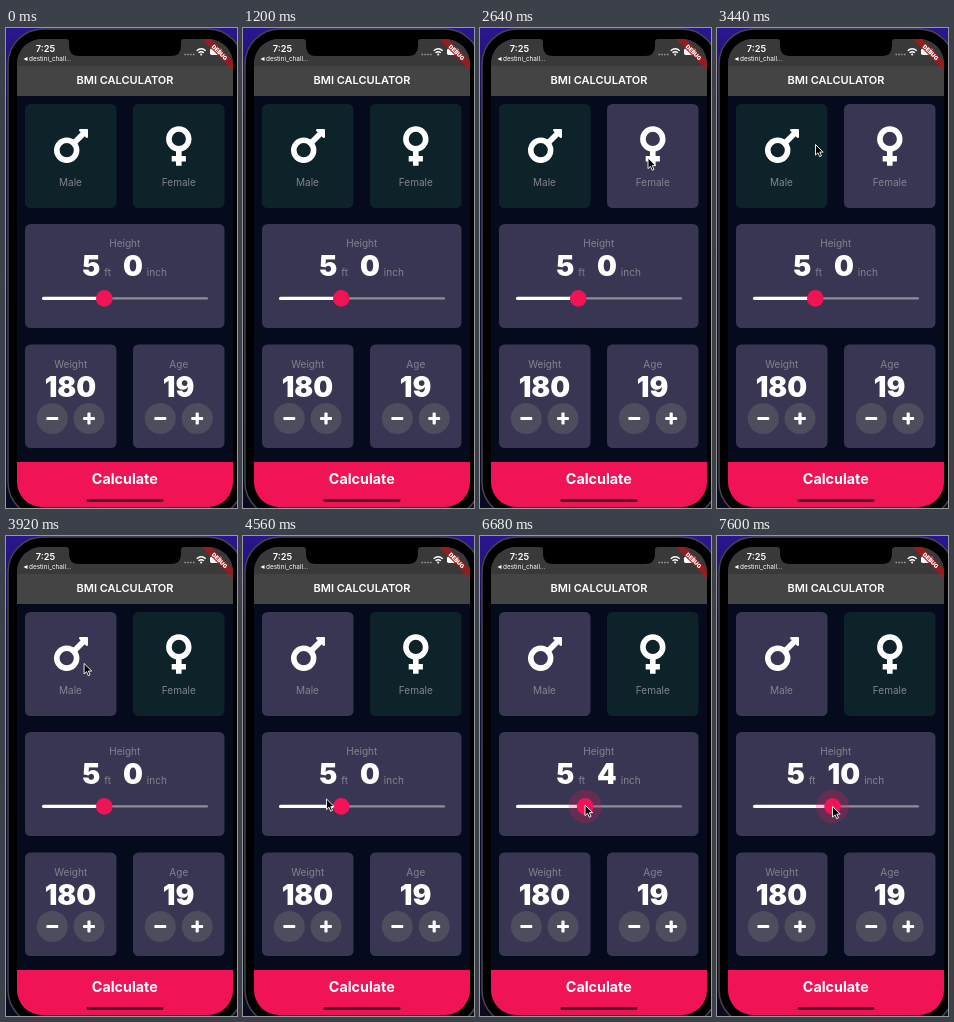
Recreate the animation shown at these times as an HTML page. Size 231 by 480 pixels, loop 8000 ms.

```html
<!DOCTYPE html>
<html lang="en">
<head>
<meta charset="utf-8">
<title>BMI calculator</title>
<style>
  html, body { margin: 0; width: 100%; height: 100%; overflow: hidden; background: #000; }
  svg { display: block; width: 231px; height: 480px; font-family: Inter, sans-serif; }
  text { fill: #fff; text-anchor: middle; }
  .label { font-size: 10px; fill: #83838f; }
  .number { font-size: 28px; font-weight: 900; fill: #fff; }
  .card { fill: #383652; }
  .card.idle { fill: #0d2329; }
  .icon { fill: none; stroke: #fff; stroke-width: 5.6; }
</style>
</head>
<body>
<svg viewBox="0 0 231 480">
  <defs>
    <linearGradient id="wall" x2="0" y2="1">
      <stop offset="0" stop-color="#2a1790"/>
      <stop offset=".2" stop-color="#130c42"/>
      <stop offset="1" stop-color="#0a0a20"/>
    </linearGradient>
    <clipPath id="screen"><rect x="11" y="11" width="216" height="468" rx="25"/></clipPath>
    <g id="minus"><circle r="15.5" fill="#4c4e5e"/><rect x="-6" y="-1.6" width="12" height="3.2" rx="1" fill="#fff"/></g>
    <g id="plus"><use href="#minus"/><rect x="-1.6" y="-6" width="3.2" height="12" rx="1" fill="#fff"/></g>
  </defs>

  <rect width="231" height="480" fill="url(#wall)"/>
  <rect x="2" y="1" width="235" height="488" rx="35" stroke="#45454b" stroke-width="1.5"/>

  <g clip-path="url(#screen)">
    <rect width="231" height="480" fill="#050a1d"/>
    <rect y="11" width="231" height="57" fill="#444"/>
    <rect y="11" width="231" height="27" fill="#393939"/>
    <path d="M60 11q3 0 3 3v4q0 10 10 10h92q10 0 10-10v-4q0-3 3-3z"/>

    <text x="39.5" y="24" font-size="9.2" font-weight="600">7:25</text>
    <path d="M17.5 31l4-2v4z" fill="#fff"/>
    <text x="23" y="33" font-size="6.4" style="text-anchor:start">destini_chall...</text>
    <path d="M178.500 26.500h10" stroke="#999" stroke-width="1.3" stroke-dasharray="1.6 1.2"/>
    <g fill="none" stroke="#fff" stroke-width="1.4">
      <path d="M190.700 22.700q4.500-4 9 0M192.500 24.800q2.700-2.300 5.400 0"/>
      <circle cx="195.200" cy="26.500" r=".4"/>
    </g>
    <rect x="204" y="20.500" width="12" height="6.500" rx="1.800" fill="#fff"/>
    <g transform="translate(227 11) rotate(45)">
      <rect x="-30" y="15.500" width="60" height="6.700" fill="#a5191c" fill-opacity=".85"/>
      <text y="20.900" font-size="5.6" font-weight="900">DEBUG</text>
    </g>
    <text x="119" y="56" font-size="11" font-weight="600">BMI CALCULATOR</text>

    <rect id="male" class="card" x="19" y="76" width="91.500" height="104" rx="5.500"/>
    <rect id="female" class="card" x="127" y="76" width="91.500" height="104" rx="5.500"/>
    <rect class="card" x="19" y="196" width="199.500" height="104" rx="5.500"/>
    <rect class="card" x="19" y="316.500" width="91.500" height="103.500" rx="5.500"/>
    <rect class="card" x="127" y="316.500" width="91.500" height="103.500" rx="5.500"/>

    <circle class="icon" cx="60.700" cy="122.200" r="9.900"/>
    <path class="icon" d="M68 115l9-9"/>
    <path d="M74 101h7q1 0 1 1v7q-.5 1.600-1.900.7l-7-7q-.6-1.200.9-1.700z" fill="#fff"/>
    <circle class="icon" cx="172.800" cy="110.900" r="9.900"/>
    <path class="icon" d="M172.800 121v16.800M165.700 130.700h14.200"/>

    <text class="label" x="64.500" y="158">Male</text>
    <text class="label" x="172.800" y="158">Female</text>
    <text class="label" x="118.800" y="218.500">Height</text>
    <text class="label" x="64.700" y="339.500">Weight</text>
    <text class="label" x="172.800" y="339.500">Age</text>
    <text class="number" x="64.500" y="368.500">180</text>
    <text class="number" x="172.500" y="368.500">19</text>
    <text class="label" x="118.500" y="247.500"><tspan class="number" id="feet"></tspan><tspan dx="4">ft</tspan><tspan class="number" id="inches" dx="12"></tspan><tspan dx="4">inch</tspan></text>

    <use href="#minus" x="46.300" y="390.500"/>
    <use href="#plus" x="83" y="390.500"/>
    <use href="#minus" x="154.300" y="390.500"/>
    <use href="#plus" x="191.200" y="390.500"/>

    <rect x="36" y="269.200" width="166" height="2.400" rx="1.200" fill="#8d8e98"/>
    <rect id="filled" x="36" y="268.700" height="3.400" rx="1.700" fill="#fff"/>
    <circle id="halo" cy="270.400" fill="#eb1555" fill-opacity=".24"/>
    <circle id="thumb" cy="270.400" r="8.300" fill="#f01457"/>

    <rect y="434" width="231" height="46" fill="#f01457"/>
    <text x="118.800" y="455.500" font-size="14.300" font-weight="700">Calculate</text>
    <rect x="80.500" y="471" width="77" height="2.800" rx="1.400" fill="#4a0a20"/>
  </g>

  <path id="cursor" d="M0 0v10.600l2.500-2.300 1.700 3.900 1.800-.8-1.700-3.800h3.400z" stroke="#fff" stroke-width=".9" stroke-linejoin="round"/>
</svg>
<script>
  const LOOP = 8000;
  const el = id => document.getElementById(id);
  const clamp = v => Math.min(1, Math.max(0, v));
  const smooth = v => v * v * (3 - 2 * v);

  // Each stop: time, x, y of the pointer tip.
  const pointerPath = [
    [1560, 92, 152], [1800, 74, 134], [2000, 74, 134], [2360, 134, 125], [2600, 168, 130],
    [3080, 168, 130], [3440, 98.500, 116.500], [3640, 78, 126], [3880, 78, 126],
    [4560, 83.500, 263], [4720, 88, 269], [5040, 97.500, 269], [5800, 97.500, 269],
    [6680, 105, 269], [7600, 115.500, 270.500]
  ];
  // Each stop: time, height in inches.
  const heightPath = [[5800, 60], [6680, 64.200], [7560, 70]];

  function along(path, t, ease = v => v) {
    const next = path.findIndex(stop => stop[0] > t);
    if (next < 0) return path.at(-1).slice(1);
    if (next === 0) return path[0].slice(1);
    const a = path[next - 1], b = path[next];
    const k = ease((t - a[0]) / (b[0] - a[0]));
    return a.slice(1).map((v, i) => v + (b[i + 1] - v) * k);
  }

  function draw(t) {
    const maleOn = t >= 1840 && t < 2640 || t >= 3600;
    const femaleOn = t >= 2640 && t < 3600;
    el('male').classList.toggle('idle', !maleOn);
    el('female').classList.toggle('idle', !femaleOn);

    const height = Math.round(along(heightPath, t)[0]);
    el('feet').textContent = Math.floor(height / 12);
    el('inches').textContent = height % 12;
    const x = 36 + (height - 24) * 166 / 96;
    el('filled').setAttribute('width', x - 36);
    el('thumb').setAttribute('cx', x);
    el('halo').setAttribute('cx', x);
    el('halo').setAttribute('r', 16.600 * smooth(clamp((t - 5480) / 160)));

    const [px, py] = along(pointerPath, t, t < 5800 ? smooth : undefined);
    el('cursor').setAttribute('transform', `translate(${px} ${py})`);
    el('cursor').setAttribute('visibility', t < 1560 ? 'hidden' : 'visible');
  }

  function tick() {
    draw(performance.now() % LOOP);
    requestAnimationFrame(tick);
  }
  tick();
</script>
</body>
</html>
```
